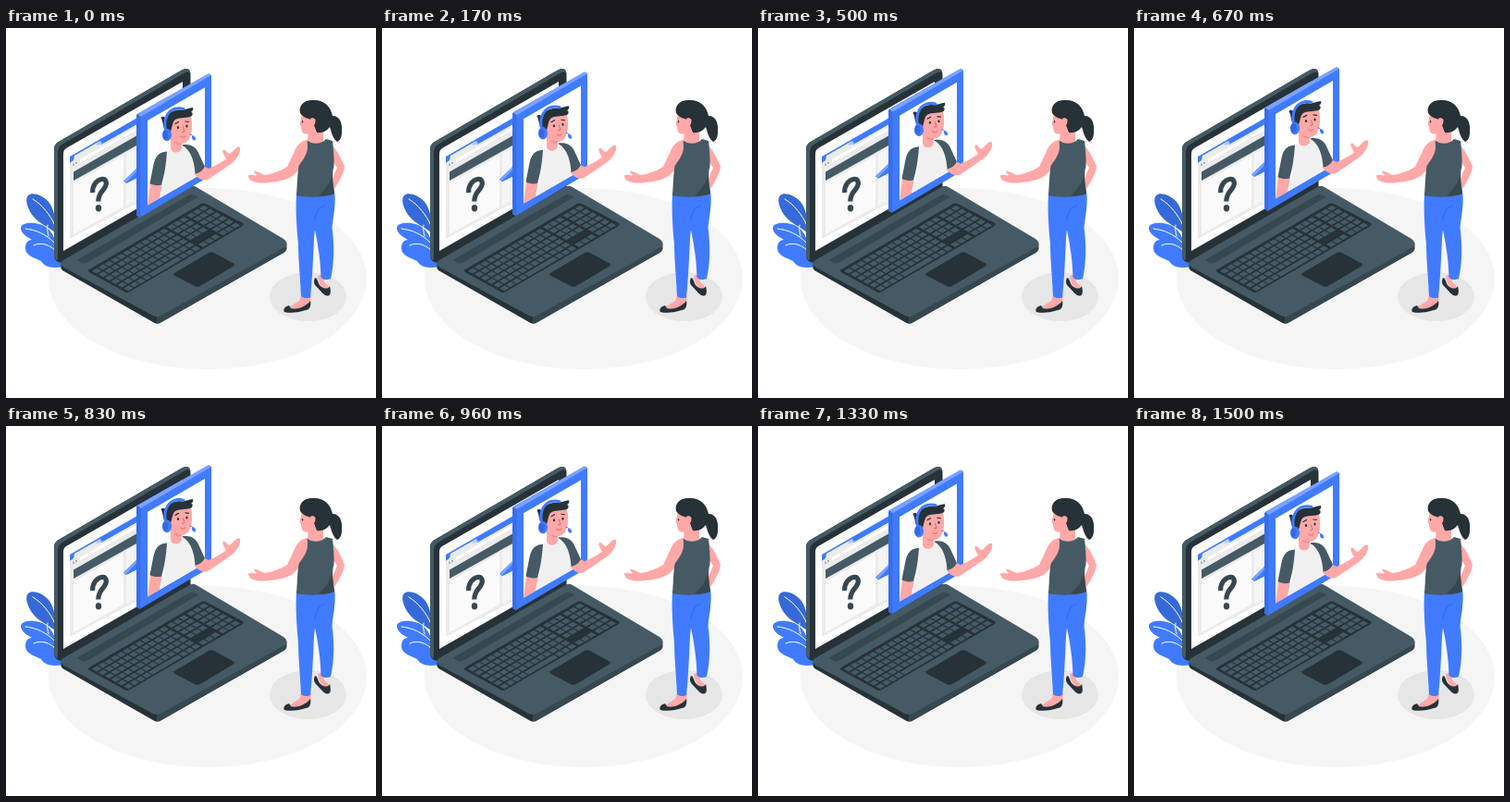
These frames come from a looping animation (400x400 px, 1.54 s). An HTML page:

```html
<!DOCTYPE html>
<html lang="en">
<head>
<meta charset="utf-8">
<title>Online support</title>
<style>
  html, body { margin: 0; width: 100%; height: 100%; overflow: hidden; background: #fff; }
  svg { display: block; width: 100vw; height: 100vh; }
  .blue { fill: #407bff; }
  .ink { fill: #263238; }
  .slate { fill: #37474f; }
  .steel { fill: #455a64; }
  .skin { fill: #ffa8a7; }
  .line { fill: none; stroke-linecap: round; stroke-linejoin: round; }
</style>
</head>
<body>
<svg viewBox="0 0 400 400" xmlns="http://www.w3.org/2000/svg">
  <defs>
    <clipPath id="view"><path d="M153 60H222V152L215 155.700L153 191.500Z"/></clipPath>
  </defs>

  <ellipse cx="218" cy="271" rx="172" ry="98" fill="#f5f5f5"/>
  <ellipse cx="326.500" cy="290.500" rx="41.500" ry="26.500" fill="#e6e6e6"/>

  <g id="plant">
    <path d="M54 222C45 214 36 212 29 203C23 195 20 185 24 181C28 177 39 180 46 188C52 195 54 207 54 222Z" fill="#376ad9"/>
    <path class="blue" d="M62 258C50 260 42 259 38 252C30 248 21 246 21 238C21 232 24 229 28 229C23 226 16 222 16 216C17 210 28 210 36 212C45 214 52 222 55 236Z"/>
    <g class="line" stroke="#fff" stroke-width="1">
      <path d="M29 185C39 191 48 202 53 214"/>
      <path d="M21 217C32 218 44 223 53 233M46 225C45 221 44 217 45 213"/>
      <path d="M30 235C38 231 48 234 56 243"/>
    </g>
  </g>

  <g id="laptop">
    <path class="ink" d="M52 131Q52 126 56 123.500L190 45.500Q199 41 199.500 50V174L60 254Q53 253 52 247Z"/>
    <path class="steel" d="M52 131Q52 126 56 123.500L190 45.500Q198 41.500 199.500 49Q197 46.500 194 48L62 125Q56 128 56 134V251Q52 250 52 246Z"/>
    <path fill="#fff" d="M62 136Q62 132 65 130L191 58V167L62 241Z"/>

    <g id="browser">
      <path fill="#ebebeb" d="M69 140L142 98V189L69 228Z"/>
      <path class="blue" d="M69 139L142 97V104L69 146Z"/>
      <path fill="#ebebeb" d="M74 138L101 122.500L103 126L142 104V112L69 154V146L73 143Z"/>
      <path fill="#fff" d="M80 142L142 106.500V110L80 145.500Z"/>
      <path class="line" d="M73 147.500V148M76 145.700V146.200" stroke="#9aa4a9" stroke-width="1.800"/>
      <path fill="#b3cbff" d="M97 125L102 122L104 125L99 127Z"/>
      <path class="steel" d="M73 155.500L142 116V126.500L73 165Z"/>
      <path fill="#fafafa" d="M73 168L127 137.500V193L73 223Z"/>
      <path fill="#f5f5f5" d="M130 136L142 129V186L130 192Z"/>
      <path d="M93.700 178C93 170.500 98 164.500 103 163.500C109 162.500 109.500 168.500 106.500 173C103.500 177.500 99.800 179 99.800 187.500" fill="none" stroke="#37474f" stroke-width="5.200"/>
      <ellipse class="slate" cx="100" cy="194.800" rx="3.200" ry="3.700"/>
    </g>

    <path class="ink" d="M59 256L163 311L303 233.500V239Q303 241.500 300 243L168 318Q163.500 321 159 318L61 262Q59 260 59 256Z"/>
    <path class="slate" d="M163 311L303.500 232.500V239Q303 241.500 300 243L168 318Q166 319.500 163 319.500Z"/>
    <path class="steel" d="M61 251.500L199 171.500Q202 170 205 171.500L300 228Q306 232 301.500 236.700L167 311Q163 313 159 311L61 258Q57 255 61 251.500Z"/>
    <path class="slate" d="M77 250.500L199 180Q202 179 208 182.500L87 254Q82 256 77 250.500Z"/>
    <path class="ink" d="M90 261L211 190Q213 189 216 190L256 211Q258 212.500 255 214.500L134 285Q131 287 128 285L90 264Q88 262.500 90 261Z"/>
    <path id="keys" class="steel"/>
    <path class="ink" d="M182 265L219 243Q222 241.500 225 243L246 254.500Q248 256 246 257.500L210 279Q207 280.500 204 279L182 267.500Q180 266 182 265Z"/>
  </g>

  <g id="card">
    <path class="blue" d="M127 165.500L143 150V161.500L130 168Z"/>
    <path fill="#7aa2ff" d="M127 165.500L141 152L143 153L130 167Z"/>
    <path class="blue" d="M141 95Q141 93.500 142.500 92.500L219 49.500L222 51V157.500Q222 159 220.500 160L147 203.500Q145 205.500 143 204L141 202.500Z"/>
    <path fill="#7aa2ff" d="M142 93L218.500 49.400Q220 49 222 51L145.500 96Z"/>
    <path fill="#396fe6" d="M141 95L142 93L145.500 96V204.800L141 202.500Z"/>
    <path fill="#fff" d="M153 100L215 64.200V155.700L153 191.500Z"/>
    <g clip-path="url(#view)">
      <path class="skin" d="M156 167L169 168C168 175 166 181 165 192H153C154 184 155 176 156 167Z"/>
      <path fill="#f0f0f0" d="M172 135L178 131L191 126.500L203 130L206 162L166 192C169 178 172 168 171 150Z"/>
      <path class="steel" d="M174 133.500C165 134 161 139 159 150L155.500 168C159 170 164 171 168 169.500C171 160 173 148 174 133.500Z"/>
    </g>
    <path class="steel" d="M190 126.500C200 124.500 206 129 209 137L215 150C213 155 209 157 204.500 158C204 147 201 132 190 126.500Z"/>
    <path class="skin" d="M204 158C209 157 213 154 215 150L219 152C226 149 232 146 238 141.500C236 138 232.500 132.500 235.500 131.500C238 131.500 239 136 242 136C246 132.500 250 126.500 253 129C254.500 134 249 143 243 147C234 153 226 159 218 164C212 166 207 162 204 158Z"/>
    <path class="skin" d="M178 114V130C179 136 188 136 190 130L189 121Z"/>
    <path fill="#f28f8f" d="M182 123L190 124V126C186 127 183 126 182 123Z"/>
    <path class="skin" d="M176 101C178 95 193 92 200 96C202 104 201.500 112 199 118C197 124 192 126 186 124C181 122 177 118 176 112Z"/>
    <path class="ink" d="M173 113C169 106 170 101 167.500 97C169 95 171 96 172 97C176 90 184 88 190 88.500C195 88.500 198 86 202 86C203 89 201 90 200 91C202 91 202 93 201 95C196 98 189 96 183 99C180 101 180 106 178 112Z"/>
    <path class="line" d="M173 112C170 102 173 91 181.500 87.700C185 86.500 189 86.500 192 87.500" stroke="#407bff" stroke-width="3"/>
    <ellipse class="blue" cx="174" cy="115.500" rx="5" ry="6.800"/>
    <ellipse cx="172.500" cy="115.500" rx="3" ry="5" fill="#3568dc"/>
    <path class="line" d="M199 115C201 115 202 117 203 118" stroke="#407bff" stroke-width="1"/>
    <ellipse class="blue" cx="203" cy="119" rx="1.800" ry="2.800" transform="rotate(-35 203 119)"/>
    <ellipse class="ink" cx="186" cy="107.500" rx="1.100" ry="1.500"/>
    <ellipse class="ink" cx="195.500" cy="106" rx="1.100" ry="1.500"/>
    <path class="line" d="M183 103.500L186.500 101.500M194 101L197.500 101.500" stroke="#263238" stroke-width="1.200"/>
    <path class="line" d="M191.500 107L193 112L190.500 112.500M188.500 117C190 118.500 192.500 118.500 194 117" stroke="#d9605f" stroke-width=".9"/>
  </g>

  <g id="woman">
    <path class="skin" d="M352 126C358 132 363 142 366 150C365 158 359 168 355 174L350 170L358 151L351 141Z"/>
    <path class="skin" d="M337 268C338 276 343 284 350 286L350 280L344 275L343 266Z"/>
    <path class="ink" d="M334 270C332 274 333 278 337 281C341 285 344 290 348 289.500C352 289 351 283 350 279C348 284 340 281 338 276C337 273 336 270 334 270Z"/>
    <path class="skin" d="M319 288L330 289L329 297C323 303 314 305 306 302L317 295Z"/>
    <path class="ink" d="M306 300C302 301 299 304 301 307C308 309 318 307 324 305C329 305 330 299 329 295C324 301 316 305 308 303Z"/>
    <path class="blue" d="M333 179L355 176C357 190 354 202 352.500 216C355 234 355 254 351 271C347 273 343 272 340.500 270C340 252 338 238 334 218Z"/>
    <path class="blue" d="M314 178L340 181C339 196 334 210 333 228C332 250 331 274 329 291C326 293 321 292 319 290C318 268 316 250 316 234C314 215 313 195 314 178Z"/>
    <path class="line" d="M334 208C335 200 337 195 344 192" stroke="#3568dc" stroke-width="1"/>
    <path class="skin" d="M326 121C319 122 315 126 312 133L304 150C296 155 287 158 279 159C275 157 271 154 268 155C269 158 271 158 271 159C267 160 263 157 262 160C262 165 270 168 278 167.500C290 167 302 165 310 160L318 152L328 139Z"/>
    <path class="skin" d="M327 108L343 106V122C341 129 331 129 326 124Z"/>
    <path class="steel" d="M325.500 121.500C332 127 342 125 346 120L353 122C354 131 355 141 354.500 150C351 160 354 169 355 179C344 184 325 183 314 181C315 168 315 158 316.500 149C322 141 328 135 325.500 121.500Z"/>
    <path class="slate" d="M354 153C352 164 347 174 338 181C344 182 350 181 355 179C354 169 352 162 354 153Z"/>
    <path class="skin" d="M320 93C318.500 98 319 100 317.500 103.500C318 105.500 319 105.500 319.200 107.500C319.500 112 321 115 325 114.500C331 115 337 112 339 107L334 92Z"/>
    <path class="ink" d="M318 92C316 84 322 78 331 78C343 77 351 84 353 95C361 95 364 103 363 113C363 118 361 122 358 123C353 119 352 113 350 107C347 111 342 114 336 113L333 105L328 104L328 98C325 98 321 96 318 92Z"/>
    <ellipse class="skin" cx="331" cy="101.500" rx="3.400" ry="4.300" transform="rotate(15 331 101.500)"/>
    <path class="line" d="M320.500 100.500V102" stroke="#263238" stroke-width="1.200"/>
  </g>
</svg>
<script>
  const LOOP = 1540, STEP = 1000 / 24, HALF = 18, LIFT = 8;
  const card = document.getElementById('card');

  // Keyboard plane: u runs along a row, v from the back row to the front.
  const point = (u, v) =>
    (91.5 + 122 * u + 41 * v).toFixed(2) + ' ' + (262.5 - 71.5 * u + 22.5 * v).toFixed(2);
  const key = (u, v, w, h) =>
    `M${point(u, v)}L${point(u + w, v)}L${point(u + w, v + h)}L${point(u, v + h)}Z`;

  function keyboard() {
    const rows = 6, cols = 18, gap = 0.012, w = (1 - 2 * gap) / cols, h = 1 / rows;
    let d = '';
    for (let r = 0; r < rows; r++) {
      for (let c = 0; c < cols; c++) {
        const block = (c > 11) + (c > 14);
        const blank = block === 1 && r === 4;
        const space = r === 5 && c > 3 && c < 9;
        if (blank || space && c > 4) continue;
        const u = c * w + block * gap + 0.005;
        d += key(u, r * h + 0.022, (space ? 5 * w : w) - 0.01, h - 0.044);
      }
    }
    document.getElementById('keys').setAttribute('d', d);
  }

  function draw(time) {
    const n = Math.min(2 * HALF, Math.floor((time % LOOP + 5) / STEP));
    const y = -LIFT * (1 - Math.abs(n / HALF - 1));
    card.setAttribute('transform', `translate(0 ${y.toFixed(3)})`);
  }

  keyboard();
  let start;
  function tick(now) {
    start ??= now;
    draw(now - start);
    requestAnimationFrame(tick);
  }
  draw(0);
  requestAnimationFrame(tick);
</script>
</body>
</html>
```
